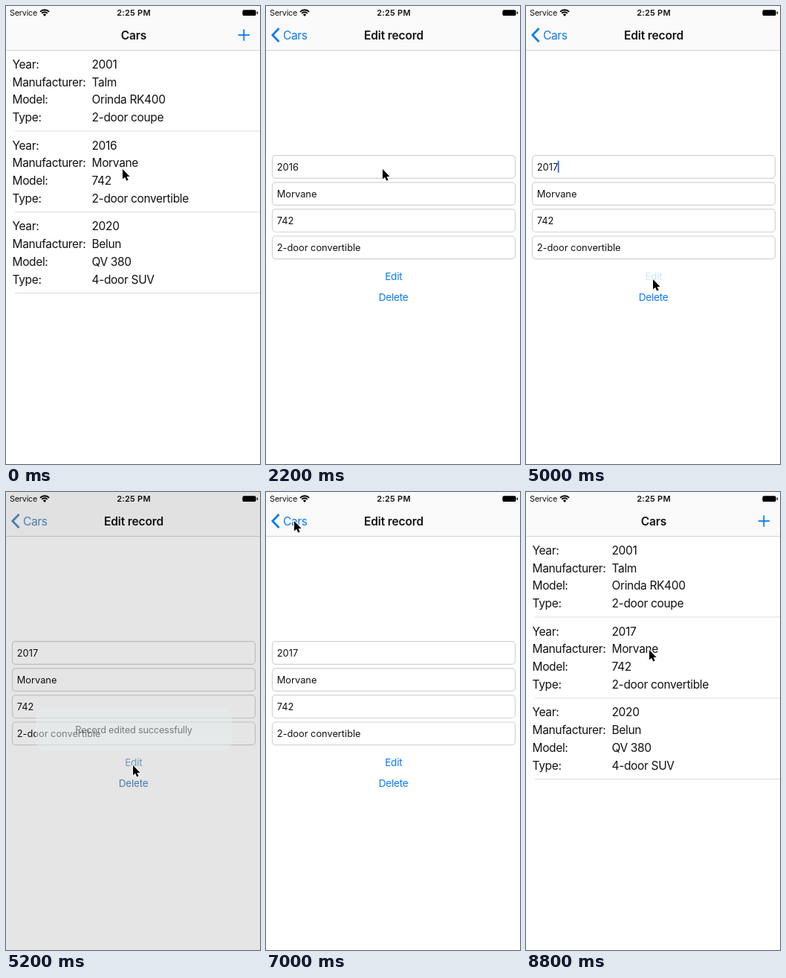
Write an HTML page with a canvas that moves like this. It is 342x615 px and loops after 9100 ms.

```html
<!DOCTYPE html>
<html lang="en">
<head>
<meta charset="utf-8">
<title>Edit record</title>
<style>
  html, body { margin: 0; width: 100%; height: 100%; overflow: hidden; background: #fff; }
  canvas { display: block; width: 342px; height: 615px; }
</style>
</head>
<body>
<canvas id="stage"></canvas>
<script>
const W = 342, H = 615, LOOP = 9100, STEP = 100;
const NAV = 60, TEAR = 264;
const canvas = document.getElementById('stage');
const ctx = canvas.getContext('2d');
const dpr = window.devicePixelRatio || 1;
canvas.width = W * dpr;
canvas.height = H * dpr;

const LABELS = ['Year:', 'Manufacturer:', 'Model:', 'Type:'];
const CARS = [
  ['2001', 'Talm', 'Orinda RK400', '2-door coupe'],
  ['2016', 'Morvane', '742', '2-door convertible'],
  ['2020', 'Belun', 'QV 380', '4-door SUV']
];

// time, x, y
const POINTER = [
  [0, 157, 219], [4000, 157, 219], [4500, 171, 367], [6400, 171, 367],
  [6900, 38, 39], [7300, 38, 39], [8000, 162, 165], [8500, 162, 165], [8800, 166, 212]
];

// size, weight, tracking in em
const FONT = {
  row: [15.5, 400, -0.022],
  title: [15.5, 600, -0.009],
  field: [12.8, 400, 0],
  button: [13.6, 400, -0.018],
  status: [10.8, 400, -0.02],
  clock: [11, 600, 0.02],
  alert: [12, 400, -0.015]
};

const clamp = v => Math.max(0, Math.min(1, v));
const ramp = (t, a, b) => clamp((t - a) / (b - a));
const lerp = (a, b, k) => a + (b - a) * k;
const ease = k => k * k * (3 - 2 * k);
const settle = ms => ms <= 0 ? 0 : 1 - Math.exp(-0.0142 * ms);

function tint(grey) {
  const c = [10, 124, 245].map(v => Math.round(lerp(v, 152, grey)));
  return `rgb(${c})`;
}

function text(str, x, cy, style, color = '#111', align = 'left', alpha = 1) {
  const [size, weight, track] = FONT[style];
  ctx.save();
  ctx.globalAlpha *= alpha;
  ctx.font = `${weight} ${size}px Inter, sans-serif`;
  ctx.letterSpacing = `${size * track}px`;
  ctx.textAlign = align;
  ctx.fillStyle = color;
  ctx.fillText(str, x, cy + size * 0.36);
  const width = ctx.measureText(str).width;
  ctx.restore();
  return width;
}

function rect(x, y, w, h, color) {
  ctx.fillStyle = color;
  ctx.fillRect(x, y, w, h);
}

function roundRect(x, y, w, h, r) {
  ctx.beginPath();
  ctx.roundRect(x, y, w, h, r);
}

function line(points, color, width) {
  ctx.beginPath();
  points.forEach(([x, y]) => ctx.lineTo(x, y));
  ctx.strokeStyle = color;
  ctx.lineWidth = width;
  ctx.stroke();
}

function drawList(s) {
  CARS.forEach((car, i) => {
    const top = NAV + i * 108.8;
    if (i === 1 && s.selected) rect(0, top - 0.5, W, 108.8, '#d2d2d5');
    car.forEach((value, j) => {
      const cy = top + 18.3 + j * 23.7;
      text(LABELS[j], 8.5, cy, 'row');
      text(i === 1 && j === 0 ? s.listYear : value, 115.5, cy, 'row');
    });
    rect(12, top + 107.4, W - 12, 1, '#dcdcde');
  });
}

function drawForm(s) {
  rect(0, 0, W, H, '#fff');
  [s.year, ...CARS[1].slice(1)].forEach((value, i) => {
    const y = 200.7 + i * 36.1;
    roundRect(8.5, y, 327, 30.6, 4.5);
    ctx.strokeStyle = '#d2d2d2';
    ctx.lineWidth = 1.2;
    ctx.stroke();
    const width = text(value, 14.8, y + 15.2, 'field');
    if (i === 0 && s.caret) {
      ctx.globalAlpha = s.caret;
      rect(14.4 + width, y + 7, 1.8, 16, '#3569dc');
      ctx.globalAlpha = 1;
    }
  });
  text('Edit', 171.8, 363.5, 'button', s.tint, 'center', s.editAlpha);
  text('Delete', 171.6, 391, 'button', s.tint, 'center');
}

function drawPages(s, p, y0, y1) {
  ctx.save();
  ctx.beginPath();
  ctx.rect(0, y0, W, y1 - y0);
  ctx.clip();
  rect(0, y0, W, y1 - y0, '#fff');
  if (p < 0.999) {
    ctx.save();
    ctx.translate(-0.3 * W * p, 0);
    drawList(s);
    ctx.restore();
    rect(0, 0, W, H, `rgba(0,0,0,${0.1 * p})`);
  }
  if (p > 0) {
    ctx.translate(W * (1 - p), 0);
    drawForm(s);
  }
  ctx.restore();
}

function drawStatus() {
  text('Service', 5, 9.5, 'status');
  text('2:25 PM', 172, 9.5, 'clock', '#111', 'center');
  ctx.strokeStyle = ctx.fillStyle = '#000';
  ctx.lineWidth = 1.9;
  [8.2, 5.2].forEach(r => {
    ctx.beginPath();
    ctx.arc(52, 13.4, r, -Math.PI * 0.76, -Math.PI * 0.24);
    ctx.stroke();
  });
  ctx.beginPath();
  ctx.moveTo(52, 14);
  ctx.arc(52, 13.6, 3, -Math.PI * 0.76, -Math.PI * 0.24);
  ctx.fill();
  roundRect(318.4, 5.2, 18.2, 7.9, 2.2);
  ctx.fill();
  roundRect(337.8, 7.6, 1.3, 3.2, 0.6);
  ctx.fill();
}

function drawNav(s, p) {
  const q = 1 - p;
  rect(0, 0, W, NAV, '#fafafa');
  rect(0, NAV - 1, W, 1, '#d4d4d6');
  drawStatus();
  text('Cars', lerp(172, 39, p), 39, 'title', '#111', 'center', q * q);
  text('Edit record', 172 + 225 * q, 39, 'title', '#111', 'center', p);
  text('Cars', 23 + 133 * q, 39, 'row', s.tint, 'left', p);
  ctx.globalAlpha = p;
  line([[17.5, 30], [8.8, 39], [17.5, 48]], s.tint, 2.7);
  ctx.globalAlpha = q;
  line([[312.6, 39], [328, 39]], s.tint, 1.8);
  line([[320.3, 31.3], [320.3, 46.7]], s.tint, 1.8);
  ctx.globalAlpha = 1;
}

function drawAlert(k, scale) {
  rect(0, 0, W, H, `rgba(0,0,0,${0.2 * k})`);
  ctx.save();
  ctx.globalAlpha = k;
  ctx.translate(172, 318);
  ctx.scale(scale, scale);
  roundRect(-124.5, -27.3, 249, 54.6, 12);
  ctx.fillStyle = '#e8eeef';
  ctx.fill();
  text('Record edited successfully', 0, 1, 'alert', '#111', 'center');
  ctx.restore();
}

function drawPointer(t) {
  const n = POINTER.findIndex(k => k[0] > t);
  const b = POINTER[n < 0 ? POINTER.length - 1 : n];
  const a = n < 0 ? b : POINTER[n - 1];
  const k = n < 0 ? 0 : ease(ramp(t, a[0], b[0]));
  ctx.save();
  ctx.translate(lerp(a[1], b[1], k), lerp(a[2], b[2], k));
  ctx.beginPath();
  [[0, 0], [0, 13.6], [3.1, 10.8], [5.2, 15.6], [7.6, 14.6], [5.5, 9.9], [9.6, 9.9]]
    .forEach(([x, y]) => ctx.lineTo(x, y));
  ctx.closePath();
  ctx.strokeStyle = '#fff';
  ctx.lineWidth = 1.8;
  ctx.lineJoin = 'round';
  ctx.stroke();
  ctx.fillStyle = '#000';
  ctx.fill();
  ctx.restore();
}

function draw(t) {
  const push = lag => settle(t - 1200 - lag) * (1 - settle(t - 7100));
  const shown = ramp(t, 5050, 5350);
  const alert = ease(shown) * (1 - ease(ramp(t, 6200, 6600)));
  const state = {
    selected: t >= 1200 && t < 5000,
    listYear: t < 5000 ? '2016' : '2017',
    year: t < 3500 ? '2016' : t < 3700 ? '201' : '2017',
    caret: t < 5100 ? ramp(t, 2800, 3000) : 0,
    editAlpha: t < 4900 ? 1 : lerp(0.2, 1, ramp(t, 5000, 5300)),
    tint: tint(alert)
  };
  ctx.setTransform(dpr, 0, 0, dpr, 0, 0);
  // the upper part of the screen refreshes slightly late
  drawPages(state, push(19), NAV, TEAR);
  drawPages(state, push(0), TEAR, H);
  drawNav(state, push(10));
  if (alert > 0) drawAlert(alert, lerp(1.12, 1, ease(shown)));
  drawPointer(t);
}

function tick() {
  const step = Math.floor(performance.now() / STEP + 0.1);
  draw(step * STEP % LOOP);
  requestAnimationFrame(tick);
}
tick();
</script>
</body>
</html>
```
